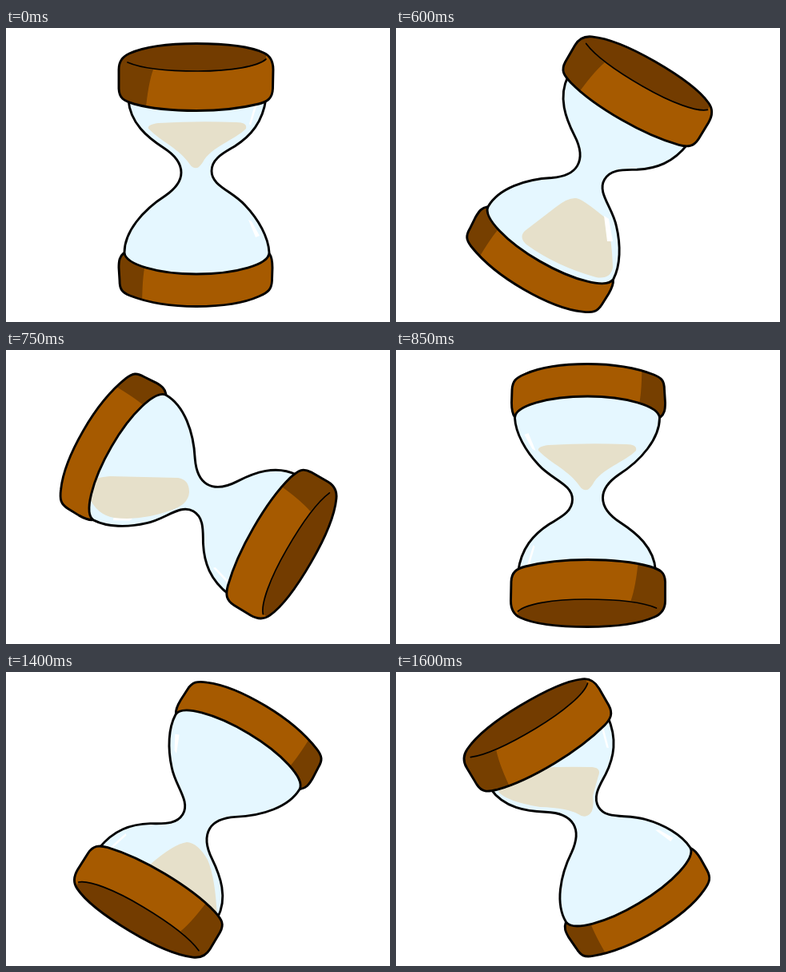
Recreate the animation shown at these times as an HTML page with a canvas. Size 480 px wide and 368 px high, loop 1650 ms.

```html
<!DOCTYPE html>
<html lang="en">
<head>
<meta charset="utf-8">
<title>Hourglass</title>
<style>
  html, body { margin: 0; width: 100%; height: 100%; overflow: hidden; background: #fff; }
  canvas { display: block; }
</style>
</head>
<body>
<canvas id="stage" width="480" height="368"></canvas>
<script>
const ctx = document.getElementById('stage').getContext('2d');
const LOOP = 1650;
const PIVOT = { x: 238.75, y: 183 };
const WOOD = '#a65a00', SHADE = '#763f00', GLASS = '#e5f7ff', SAND = '#e6e0ca';
const path = d => new Path2D(d);

// The hourglass, standing upright with its lid on top
const base = path('M147 282C142 286 141 291 141 300L142 316C142 327 145 331 155 335C178 344 205 348.500 238 348.500' +
  'C270 348.500 298 344 316 336C328 331 332 327 332.500 316L333 300C333 291 332 286 329 282');
const baseShade = path('M130 270L174 270L173 301Q170 318 170 355L130 355Z');
const glass = path('M153 90C155 119 177 137 197 150C211 159 219 169 219 181C219 192 212 201 199 210' +
  'C171 228 148 255 148 281C149 296 190 308 238 308C288 308 329 296 329 281C328 262 316 240 299 222' +
  'C283 204 257 198 257 179C257 163 273 156 286 148C306 135 321 118 325 88Z');
const lid = path('M141 52C141 42 145 36 154 32C174 23 205 19.500 238 19.500C275 19.500 305 23 322 31' +
  'C331 35 334 42 334 52L333.500 76C333 88 327 92 316 95C292 101 267 103.500 238 103.500' +
  'C205 103.500 178 100 160 95C147 91 141.500 88 141 76Z');
const lidTop = path('M152 43C168 50 200 54 240 54C282 54 315 48 325 39L325 10L140 10L140 43Z');
const lidShade = path('M130 40L152 43Q165 49 184 52Q177 72 174 110L130 110Z');
const lidRim = path('M152 43C168 50 200 54 240 54C282 54 315 48 325 39');
const shine = path('M311 96L314 95L306 122L304 120ZM303 240L307 242L317 260L312 262Z');

// Sand while upright: level and half width above, peak and half width below
function topSand(y, w) {
  const l = 239 - w, r = 239 + w, h = 164 - y;
  return `M${l} ${y + 8}C${l + w * .28} ${y + 8 + h * .37} ${l + w * .63} ${y + 8 + h * .54} 230 171` +
    `Q238 181 246 168C${r - w * .72} ${y + 8 + h * .5} ${r - w * .22} ${y + 8 + h * .3} ${r} ${y + 8}` +
    `Q${r + 2} ${y} ${r - w * .2} ${y}Q239 ${y - 2} ${l + w * .2} ${y + 1}Q${l - 2} ${y + 3} ${l} ${y + 8}Z`;
}
function pile(y, w) {
  const h = 288 - y, m = 241;
  return `M${m} ${y}Q${m - w * .3} ${y + h * .4} ${m - w * .85} ${288 - h * .2}` +
    `Q${m - w * 1.25} 290 ${m - w * .75} 296Q240 303 ${m + w * .75} 296` +
    `Q${m + w * 1.2} 290 ${m + w * .85} ${288 - h * .25}Q${m + w * .3} ${y + h * .45} ${m} ${y}Z`;
}
const stream = 'M234 168L245 168Q241 182 242 205L244 254L239 254Q239 215 235 198Z';
const pour = [
  topSand(118, 61),
  topSand(127, 50) + stream + pile(282, 50),
  topSand(138, 35) + stream + pile(267, 58),
  topSand(149, 21) + stream + pile(250, 62),
  stream + pile(233, 62),
  pile(217, 62)
].map(path);

// Sand while turning, kept level with the ground
const tilt30 = path('M225 213Q232 213 262 238Q270 262 271 300Q268 315 250 312Q200 298 163 271' +
  'Q153 262 161 254L200 224Q215 212 225 213Z');
const tilt210 = path('M226 213Q240 214 252 235Q262 258 264 310L160 270L180 241Q210 215 226 213Z');
const tilt60 = path('M137 228L180 207Q200 202 225 208Q234 213 232 225Q227 260 213 285Q202 304 192 298' +
  'Q160 280 140 248Q130 234 137 228Z');
const tilt90 = path('M124 198Q126 192 148 188Q172 176 186 180L220 183Q228 186 227 197Q220 212 200 235' +
  'Q178 260 158 268Q144 274 139 262Q127 232 124 198Z');
const tilt120 = path('M100 172Q102 160 130 158L215 160Q229 162 229 178Q228 194 205 201Q170 214 135 210' +
  'Q108 205 100 172Z');
const tilt150 = path('M128 150Q130 138 165 122Q180 118 245 119Q257 120 253 130L246 155Q248 172 243 177' +
  'Q236 184 228 178Q214 170 180 169Q138 162 128 150Z');

const shine30 = path('M260 235L266 239L271 267L264 267Z');
const shine90 = path('M214 153L223 160L222 165L215 162Z');

// start, angle, shift x, shift y, sand, own shine
const poses = [
  ...[0, 100, 200, 300, 400, 500].map((t, i) => [t, 0, 0, 0, pour[i]]),
  [600, 30, 4, 1, tilt30, shine30],
  [650, 60, 4, 1.5, tilt60, shine30],
  [700, 90, 2, 2, tilt90, shine90],
  [750, 120, 1, 1, tilt120],
  [800, 150, 0, 1, tilt150],
  ...[850, 900, 1000, 1100, 1200, 1300].map((t, i) => [t, 180, 0, 0, pour[i]]),
  [1400, 211, 0, 1, tilt210],
  [1450, 240, 0, 1, tilt60],
  [1500, 270, 0, 0, tilt90],
  [1550, 300, 1, -.5, tilt120],
  [1600, 329, 1, -1, tilt150]
];

function fill(shape, color) {
  ctx.fillStyle = color;
  ctx.fill(shape);
}
function inside(shape, draw) {
  ctx.save();
  ctx.clip(shape);
  draw();
  ctx.restore();
}
function outline(shape, width = 2.9) {
  ctx.lineWidth = width;
  ctx.stroke(shape);
}

function draw([, angle, dx, dy, sand, ownShine]) {
  ctx.resetTransform();
  fill(path('M0 0H480V368H0Z'), '#fff');
  ctx.lineJoin = ctx.lineCap = 'round';
  ctx.strokeStyle = '#000';
  ctx.translate(PIVOT.x + dx, PIVOT.y + dy);
  ctx.rotate(angle * Math.PI / 180);
  ctx.translate(-PIVOT.x, -PIVOT.y);

  fill(base, WOOD);
  inside(base, () => fill(baseShade, SHADE));
  outline(base);

  fill(glass, GLASS);
  inside(glass, () => {
    if (!ownShine) fill(shine, '#fff');
    ctx.resetTransform();
    fill(sand, SAND);
    if (ownShine) fill(ownShine, '#fff');
  });
  outline(glass);

  fill(lid, WOOD);
  inside(lid, () => {
    fill(lidShade, SHADE);
    fill(lidTop, '#733c00');
  });
  outline(lidRim, 1.7);
  outline(lid);
}

const start = performance.now();
let shown;
function tick(now) {
  const t = Math.max(0, now - start) % LOOP;
  const pose = poses.findLast(p => p[0] <= t);
  if (pose !== shown) draw(shown = pose);
  requestAnimationFrame(tick);
}
tick(start);
</script>
</body>
</html>
```
